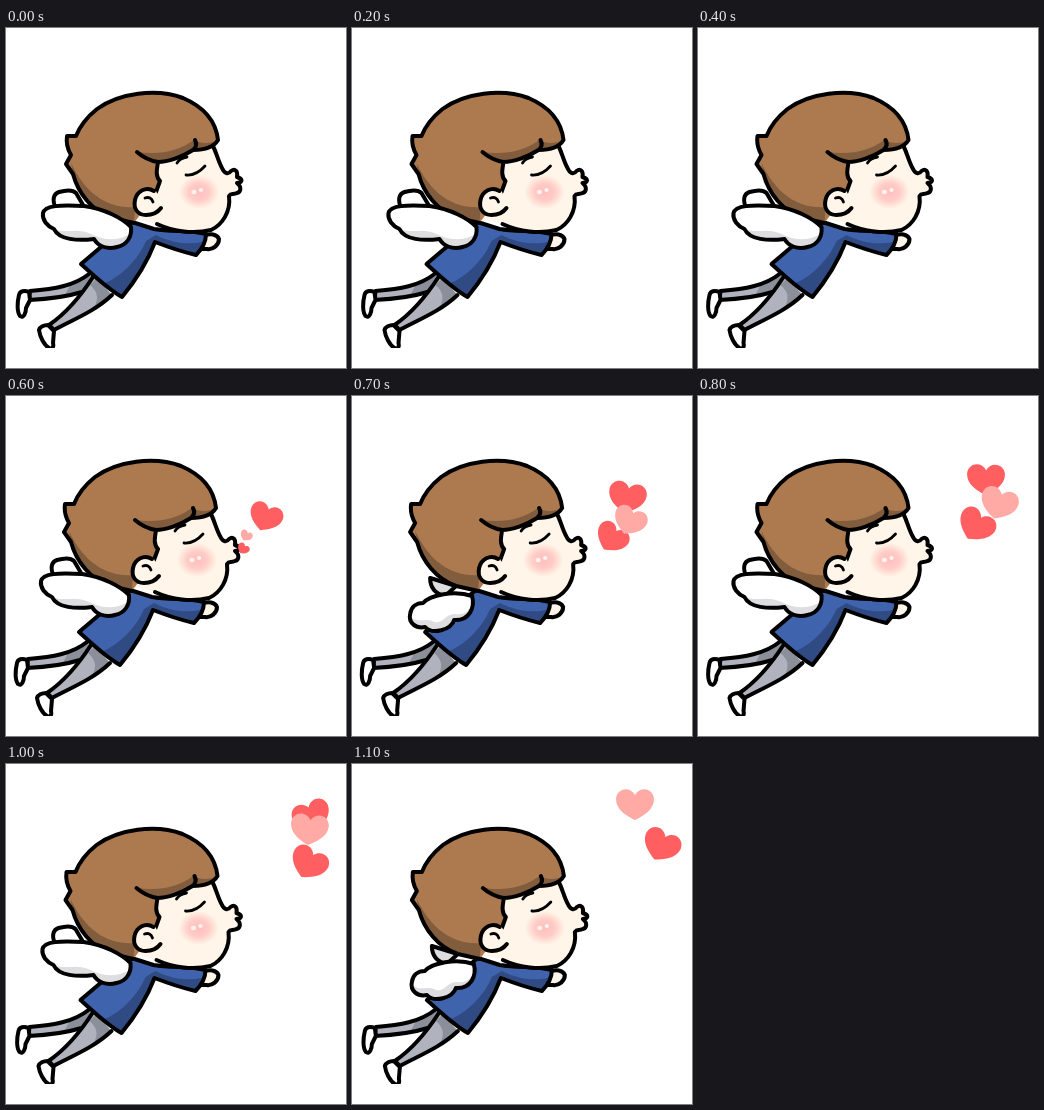
Write an HTML page that moves like this. It is 340 px wide and 340 px high and loops after 1200 ms.

```html
<!DOCTYPE html>
<html lang="en">
<head>
<meta charset="utf-8">
<title>Flying kiss</title>
<style>
html, body { margin: 0; width: 100%; height: 100%; overflow: hidden; background: #fff; }
svg { display: block; width: 100vw; height: 100vh; }
.ink { stroke: #000; stroke-width: 4; stroke-linejoin: round; stroke-linecap: round; }
.line { fill: none; }
.thin { stroke-width: 2.8; }
.white { fill: #fff; }
.tint { fill: #dedee0; }
.skin { fill: #fff5e8; }
.hair { fill: #ad7a50; }
.hairShade { fill: #815c3d; }
.shirt { fill: #4063ad; }
.shirtShade { fill: #304a84; }
.grey { fill: #b0b3bd; }
.greyShade { fill: #8b8f99; }
</style>
</head>
<body>
<svg viewBox="0 0 340 340">
  <defs>
    <radialGradient id="blush">
      <stop offset="0" stop-color="#ffbfbd"/>
      <stop offset=".5" stop-color="#ffcbc6"/>
      <stop offset="1" stop-color="#fff5e8"/>
    </radialGradient>
    <clipPath id="floor"><rect width="340" height="320"/></clipPath>
  </defs>

  <g clip-path="url(#floor)"><g id="boy">
    <path class="ink white up" d="M50 180C46 173 47 166 53 164C60 162 67 162 70 165L80 182Z"/>
    <path class="ink tint down" d="M80 182C80 192 86 198 95 200L106 190Z"/>

    <!-- legs -->
    <path class="grey" d="M83 246C68 258 48 261 24 263L23 272C44 271 60 269 76 264L90 252Z"/>
    <path class="greyShade" d="M83 247L64 257L58 269L77 264L90 252Z"/>
    <path class="ink line" d="M83 246C68 258 48 261 24 263L23 272C44 271 60 269 76 264"/>
    <path class="ink white" d="M23 264C18 262 14 263 13 267C11 275 11 284 14 288C18 291 20 284 20 280L24 272Z"/>
    <path class="grey" d="M87 249C76 266 62 284 43 297L48 302C66 292 88 284 106 267Z"/>
    <path class="greyShade" d="M84 257C92 264 93 270 88 280L106 267L91 250Z"/>
    <path class="ink line" d="M87 249C76 266 62 284 43 297L48 302C66 292 88 284 106 267"/>
    <path class="ink white" d="M42 297C38 297 34 299 33 302C34 309 38 317 43 320C46 322 48 319 47 315L48 303Z"/>

    <!-- shirt and arm -->
    <path class="ink skin" d="M198 208C204 205 211 206 213 211C213 217 207 222 201 221L192 221Z"/>
    <path class="shirt" d="M126 194L148 201C167 204 184 202 200 206C200 213 196 221 190 227C177 224 162 219 149 214C141 235 130 252 116 269C103 262 88 248 75 236C91 222 108 208 126 194Z"/>
    <path class="shirtShade" d="M150 207C166 215 180 217 197 214L190 227C177 224 162 219 149 214C141 235 130 252 116 269L97 256C115 249 132 232 140 213Z"/>
    <path class="ink line" d="M126 194L148 201C167 204 184 202 200 206C200 213 196 221 190 227C177 224 162 219 149 214C141 235 130 252 116 269C103 262 88 248 75 236C91 222 108 208 126 194Z"/>

    <!-- face -->
    <path id="face" class="skin" d="M207 118C211 126 212 133 216 140C219 147 223 146 225 143C229 140 232 143 231 149C237 151 237 154 231 155C236 159 235 164 231 165C227 167 225 165 223 168C225 184 216 197 205 202C188 206 168 204 151 196L128 190L140 122Z"/>
    <path class="ink line" d="M207 118C211 126 212 133 216 140C219 147 223 146 225 143C229 140 232 143 231 149C237 151 237 154 231 155C236 159 235 164 231 165C227 167 225 165 223 168C225 184 216 197 205 202C188 206 168 204 151 196"/>
    <ellipse cx="193" cy="164" rx="20" ry="17" fill="url(#blush)"/>
    <ellipse cx="188" cy="164" rx="2.6" ry="2.2" fill="#fff3f0"/>
    <ellipse cx="195" cy="162" rx="2.2" ry="2" fill="#fff3f0"/>
    <path class="ink line thin" d="M180 147Q190 148 199 138M171 135Q174 130 181 129"/>

    <!-- hair -->
    <path class="hair" d="M212 112C210 94 198 79 177 70C150 60 113 65 91 81C81 89 74 98 70 108L61 108C60 115 62 122 65 127L60 136L67 146C72 165 86 183 106 190L128 195L150 165L154 153C149 148 151 141 152 134C162 134 176 129 187 122Q206 122 212 112Z"/>
    <path class="hairShade" d="M65 135C80 167 103 181 129 179L128 195C104 193 78 180 67 146Z"/>
    <path class="hairShade" d="M131 124C155 127 172 123 188 112C195 116 204 116 212 112Q206 122 187 122C176 129 162 134 152 134Q140 132 131 124Z"/>
    <path class="ink line" d="M128 195L106 190C86 183 72 165 67 146L60 136L65 127C62 122 60 115 61 108L70 108C74 98 81 89 91 81C113 65 150 60 177 70C198 79 210 94 212 112Q206 122 187 122C176 129 162 134 152 134Q140 132 131 124M152 134C151 141 149 148 154 153L150 164M187 122Q192 118 189 112"/>

    <!-- ear -->
    <path class="skin" d="M150 163C141 157 131 163 129 172C127 181 132 187 140 187C148 187 154 183 157 178Z"/>
    <path class="ink line" d="M148 163C140 158 131 163 129 172C127 181 132 187 140 187C147 187 152 184 155 180"/>
    <path class="ink line thin" d="M139 170Q145 168 147 174"/>

    <g class="up">
      <path class="white" d="M37 185C39 177 55 177 78 178C99 181 116 190 125 199C126 209 121 217 111 219C101 222 92 218 88 211C72 213 53 212 48 201C41 198 36 192 37 185Z"/>
      <path class="tint" d="M48 201C60 206 72 199 85 206C99 213 112 213 124 206C122 214 118 218 111 219C101 222 92 218 88 211C72 213 53 212 48 201Z"/>
      <path class="ink line" d="M125 199C116 190 99 181 78 178C55 177 39 177 37 185C36 192 41 198 48 201C53 212 72 213 88 211C92 218 101 222 111 219C121 217 126 209 125 199"/>
    </g>
    <g class="down">
      <path class="white" d="M73 207C80 199 104 194 122 200C125 212 119 225 104 224C101 234 82 239 75 231C65 232 58 225 61 216C63 210 68 207 73 207Z"/>
      <path class="tint" d="M61 221C68 228 77 221 84 226C93 228 95 218 105 218Q116 220 122 209C122 219 116 225 104 224C101 234 82 239 75 231C67 232 61 228 61 221Z"/>
      <path class="ink line" d="M122 200C104 194 80 199 73 207C66 207 61 211 60 218C58 227 66 233 75 231C82 239 101 234 104 224C119 225 125 212 122 200"/>
    </g>
  </g></g>
  <g id="hearts"></g>
</svg>
<script>
const STEP = 100, STEPS = 12, FLIGHT = 5;
const HEART = 'M0 15C-8 11-19 5-19-6C-18-17-5-19 0-10C5-19 18-17 19-6C19 5 8 11 0 15Z';
const boy = document.getElementById('boy');
const sky = document.getElementById('hearts');
const wings = ['.up', '.down'].map(name => document.querySelectorAll(name));

// Each heart flies along a curve: from, bend, to
const hearts = [
  { color: '#ff5f61', start: 5, from: [241, 143], bend: [290, 88], to: [306, 53], tilt: [33, -20] },
  { color: '#ff5f61', start: 6, from: [237, 153], bend: [298, 129], to: [309, 82], tilt: [36, 26] },
  { color: '#ffaaa5', start: 6, from: [240, 140], bend: [352, 107], to: [283, 41], tilt: [30, 0] }
];

for (const heart of hearts) {
  heart.node = document.createElementNS('http://www.w3.org/2000/svg', 'path');
  heart.node.setAttribute('d', HEART);
  heart.node.setAttribute('fill', heart.color);
  sky.append(heart.node);
}

const mix = (a, b, p) => a + (b - a) * p;
const curve = (a, b, c, p) => mix(mix(a, b, p), mix(b, c, p), p);

function show(node, on) {
  node.style.display = on ? '' : 'none';
}

function placeHeart({ node, start, from, bend, to, tilt }, step) {
  const p = (step - start) / FLIGHT;
  show(node, p >= 0 && p <= 1);
  const [x, y] = [0, 1].map(i => curve(from[i], bend[i], to[i], p));
  const size = Math.min(1, .33 + 2.8 * Math.max(0, p));
  node.setAttribute('transform',
    `translate(${x} ${y}) rotate(${mix(...tilt, p)}) scale(${size})`);
}

function draw(now) {
  const step = Math.floor(now / STEP) % STEPS;
  const sway = Math.cos(2 * Math.PI * step / STEPS) - 1;
  boy.setAttribute('transform', `translate(${sway} 0)`);
  wings.forEach((parts, side) => parts.forEach(part => show(part, step % 2 === side)));
  hearts.forEach(heart => placeHeart(heart, step));
  requestAnimationFrame(draw);
}
draw(performance.now());
</script>
</body>
</html>
```
